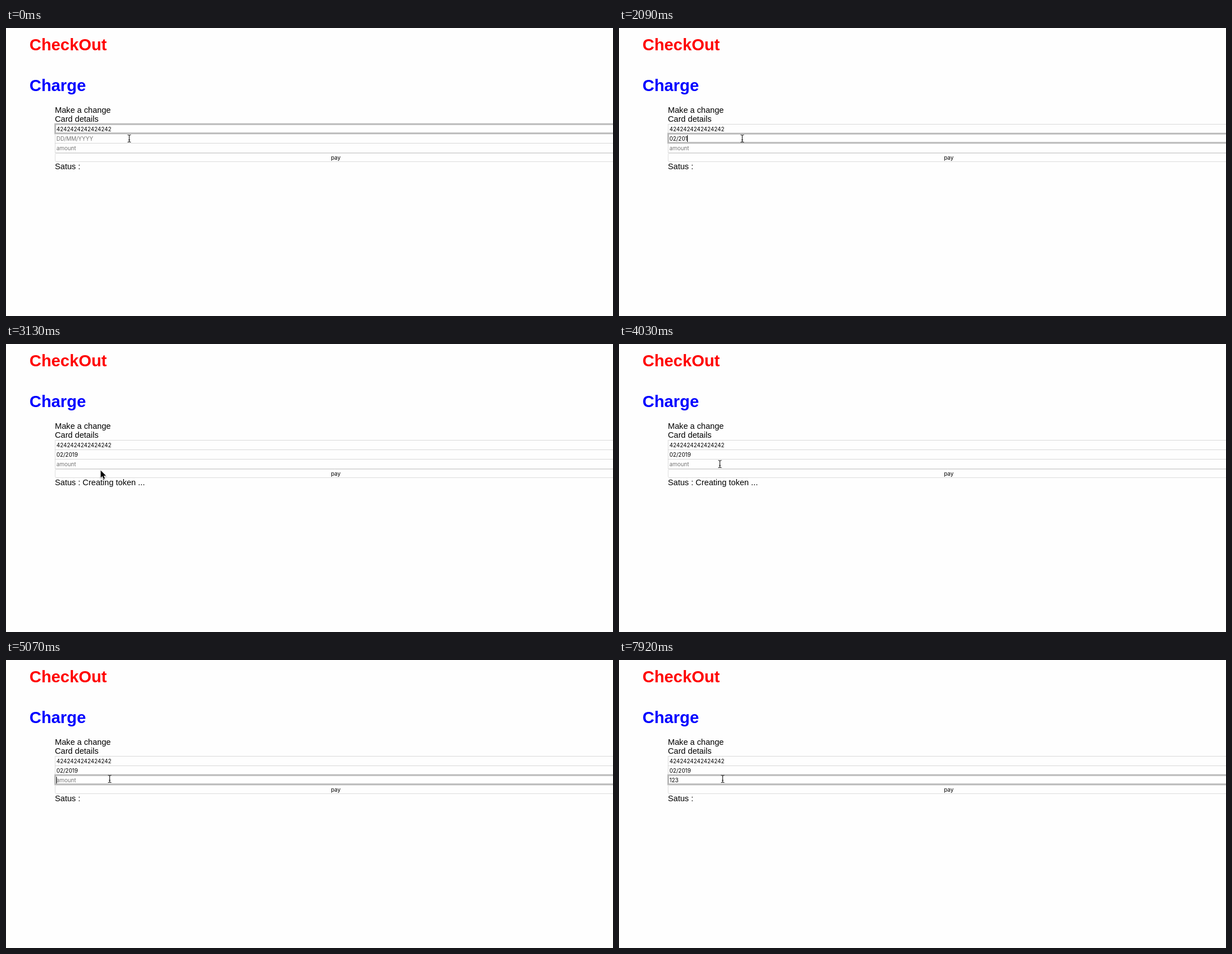
Animation of 1086x516 px, one loop 8 s. Source, as an HTML page with a canvas:

```html
<!DOCTYPE html>
<html lang="en">
<head>
<meta charset="utf-8">
<title>Checkout form</title>
<style>
html, body { margin: 0; width: 1086px; height: 516px; overflow: hidden; background: #fefefe; }
canvas, svg { position: absolute; left: 0; top: 0; display: block; }
text { font: 14.63px "Liberation Sans", Arial, sans-serif; white-space: pre; }
.head { font-size: 29.3px; font-weight: bold; }
.field { font: 9.9px Inter, sans-serif; }
</style>
</head>
<body>
<canvas id="shapes" width="1086" height="516"></canvas>
<svg width="1086" height="516">
  <text class="head" x="42" y="39.5" fill="#f00">CheckOut</text>
  <text class="head" x="42" y="112.5" fill="#00f">Charge</text>
  <text x="87.5" y="151.7">Make a change</text>
  <text x="87.5" y="168.2">Card details</text>
  <text class="field" x="90.3" y="184.5">4242424242424242</text>
  <text class="field" id="date" x="90.3" y="201.9"></text>
  <text class="field" id="amount" x="90.3" y="219.2"></text>
  <text class="field" x="590" y="235.6" text-anchor="middle">pay</text>
  <text id="status" x="87.5" y="253"></text>
</svg>
<script>
const LOOP = 8000;
const ctx = document.getElementById('shapes').getContext('2d');
const dateText = document.getElementById('date');
const amountText = document.getElementById('amount');
const statusText = document.getElementById('status');

// Each track lists [start time, value]; a value holds until the next one.
const focusTrack = [[0, 0], [140, 1], [3130, -1], [4180, 2]];
const dateTrack = [[0, ''], [890, '02'], [1040, '02/'], [1490, '02/2'], [1790, '02/20'],
  [2090, '02/201'], [2240, '02/2019']];
const amountTrack = [[0, ''], [5970, '1'], [6120, '123'], [7320, '123.'], [7470, '123.0'],
  [7770, '123.'], [7920, '123']];
const statusTrack = [[0, ''], [3130, 'Creating token ...'], [4470, '']];
const caretTrack = [[0, false], [140, true], [590, false], [890, true], [2680, false],
  [4180, true], [4620, false], [5070, true], [5670, false], [5970, true],
  [6570, false], [7020, true], [7920, false]];
const pointerTrack = [[0, ['beam', 220.5, 198]], [2530, ['beam', 214, 202]],
  [2680, ['beam', 192, 215]], [2830, ['arrow', 172, 224]], [2980, ['arrow', 169, 226]],
  [3430, ['arrow', 170, 226]], [3730, ['arrow', 174, 222]], [3880, ['beam', 178.5, 217]],
  [4030, ['beam', 180.5, 215]], [4180, ['beam', 184.5, 214]], [4470, ['beam', 185.5, 213]]];

function valueAt(track, t) {
  let value = track[0][1];
  for (const [start, next] of track) if (t >= start) value = next;
  return value;
}

function setText(el, text, color = '#000') {
  if (el.textContent !== text) el.textContent = text;
  el.setAttribute('fill', color);
}

function box(y, h, color, width) {
  ctx.strokeStyle = color;
  ctx.lineWidth = width;
  ctx.strokeRect(88, y, 1010, h);
}

function drawFields(focus) {
  const tops = [172.5, 189.5, 206.5];
  tops.forEach(y => box(y, 17, '#d8d8d8', 1));
  ctx.strokeStyle = '#dcdcdc';
  ctx.lineWidth = 1;
  ctx.beginPath();
  ctx.roundRect(88, 224.5, 1010, 15, 2);
  ctx.stroke();
  if (focus < 0) return;
  box(tops[focus] - 0.2, 16.4, '#e2e2e2', 4);
  box(tops[focus] - 0.2, 16.4, '#b2b2b2', 2);
}

function drawBeam(x, y) {
  ctx.beginPath();
  for (const s of [-1, 1]) {
    ctx.moveTo(x - 3, y + s * 6.5);
    ctx.quadraticCurveTo(x, y + s * 6.5, x, y + s * 5);
    ctx.quadraticCurveTo(x, y + s * 6.5, x + 3, y + s * 6.5);
  }
  ctx.moveTo(x, y - 6);
  ctx.lineTo(x, y + 6);
  ctx.moveTo(x - 1.5, y + 2.5);
  ctx.lineTo(x + 1.5, y + 2.5);
  ctx.strokeStyle = '#222';
  ctx.lineWidth = 1.2;
  ctx.stroke();
}

function drawArrow(x, y) {
  const points = [[0, 0], [0, 13], [3, 10.2], [5.2, 15.3], [7.4, 14.3], [5.2, 9.4], [9.3, 9.4]];
  ctx.save();
  ctx.translate(x + 0.5, y + 0.5);
  ctx.beginPath();
  points.forEach(p => ctx.lineTo(...p));
  ctx.closePath();
  ctx.shadowColor = 'rgba(0,0,0,0.4)';
  ctx.shadowBlur = 2;
  ctx.shadowOffsetY = 1;
  ctx.strokeStyle = '#fff';
  ctx.lineWidth = 1.6;
  ctx.stroke();
  ctx.shadowColor = 'transparent';
  ctx.fillStyle = '#000';
  ctx.fill();
  ctx.restore();
}

function drawCaret(el, text) {
  const width = text ? el.getComputedTextLength() : 0;
  ctx.fillStyle = '#000';
  ctx.fillRect(Math.round(90.3 + width), Number(el.getAttribute('y')) - 9.9, 1, 12);
}

function render(t) {
  const focus = valueAt(focusTrack, t);
  const date = valueAt(dateTrack, t);
  const amount = valueAt(amountTrack, t);
  const [kind, x, y] = valueAt(pointerTrack, t);

  setText(dateText, date || 'DD/MM/YYYY', date ? '#000' : '#757575');
  setText(amountText, amount || 'amount', amount ? '#000' : '#757575');
  setText(statusText, 'Satus : ' + valueAt(statusTrack, t));

  ctx.fillStyle = '#fefefe';
  ctx.fillRect(0, 0, 1086, 516);
  drawFields(focus);
  if (valueAt(caretTrack, t)) {
    if (focus === 1) drawCaret(dateText, date);
    if (focus === 2) drawCaret(amountText, amount);
  }
  (kind === 'beam' ? drawBeam : drawArrow)(x, y);
}

const begin = performance.now();
function tick() {
  render((performance.now() - begin) % LOOP);
  requestAnimationFrame(tick);
}
tick();
</script>
</body>
</html>
```
